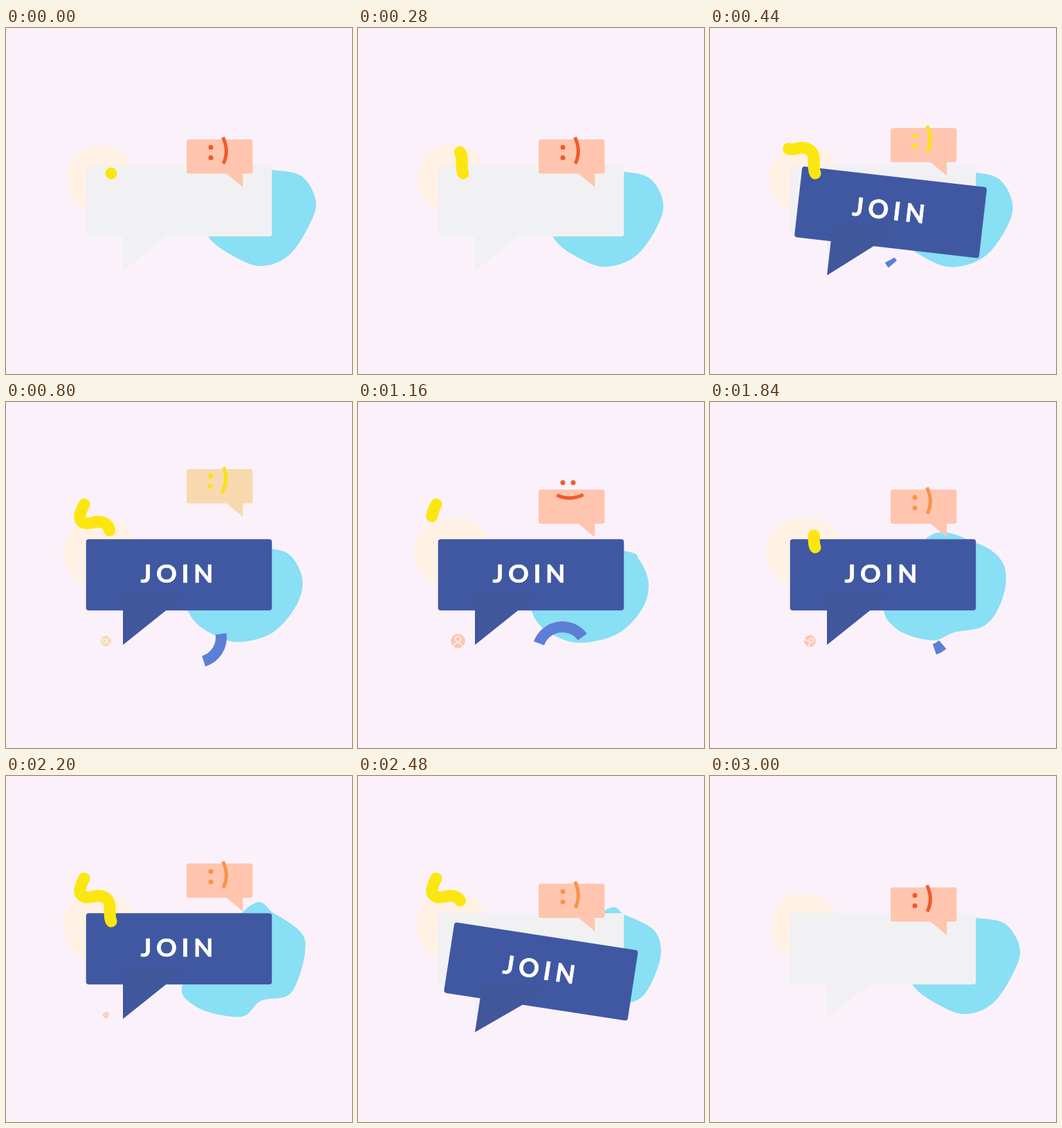
An HTML page for the animation above (3.04 s loop, 500x500 px).

```html
<!DOCTYPE html>
<html lang="en">
<head>
<meta charset="utf-8">
<title>Join</title>
<style>
html, body { margin: 0; width: 100%; height: 100%; overflow: hidden; background: #fbf1fb; }
svg { display: block; width: 100%; height: 100%; }
text { font: 700 37px Lato, "Open Sans", sans-serif; letter-spacing: 6.6px; fill: #fff; stroke: #fff; stroke-width: .7; }
</style>
</head>
<body>
<svg viewBox="0 0 500 500">
  <path id="cream" fill="#fff1e3"/>
  <path id="blob" fill="#89dff4"/>
  <g fill="#f1f1f3">
    <rect x="115.700" y="198.300" width="268.600" height="103" rx="4"/>
    <path d="M169 290H244L169 351Z"/>
  </g>
  <path id="arc" fill="none" stroke="#5c7fd5" stroke-width="16"/>
  <g id="join">
    <rect x="115.700" y="198.300" width="268.600" height="103" rx="4" fill="#4058a2"/>
    <path d="M169 275H262L231.500 301L169 351Z" fill="#40579c"/>
    <text x="194.500" y="260.500">JOIN</text>
  </g>
  <g id="chat">
    <g id="chatBody">
      <rect x="261" width="95.500" height="49.500" rx="3.500"/>
      <path d="M317 48H342.300V69Z"/>
    </g>
    <g id="smile">
      <circle cx="296" cy="11.500" r="3.500"/>
      <circle cx="296" cy="26.500" r="3.500"/>
      <path id="mouth" d="M313.500 -3Q323 17 314 35" fill="none" stroke-width="5"/>
    </g>
  </g>
  <g id="user">
    <circle id="disc" r="10.300"/>
    <g fill="none" stroke="#fbf1fb" stroke-width="1.800">
      <circle cy="-3" r="3.800"/>
      <path d="M-7 8.500A7.100 7.100 0 0 1 7 8.500"/>
    </g>
  </g>
  <path id="worm" pathLength="1" fill="none" stroke="#fbe70f" stroke-width="17" stroke-linecap="round"
    d="M152 210C149 203 150.500 197 150 188C149 175 138 171 126 174C113 178 103 172 108 160C109 155 111 152 113 148"/>
</svg>
<script>
const LOOP = 3040, STEP = 40;
const $ = id => document.getElementById(id);
const set = (id, name, value) => $(id).setAttribute(name, value);
const mix = (a, b, k) => a.map((v, i) => v + (b[i] - v) * k);
const ramp = (t, from, to) => Math.min(1, Math.max(0, (t - from) / (to - from)));
const ease = (t, from, to) => { const u = ramp(t, from, to); return u * u * (3 - 2 * u); };
const within = (t, from, to) => t >= from && t < to;
const polar = (cx, cy, r, deg) => {
  const a = deg * Math.PI / 180;
  return [cx + r * Math.cos(a), cy + r * Math.sin(a)];
};

// Closed smooth curve through a flat list of points.
function closed(p) {
  const n = p.length / 2;
  const pt = i => { const j = (i + n) % n; return [p[2 * j], p[2 * j + 1]]; };
  let d = "M" + pt(0);
  for (let i = 0; i < n; i++) {
    const a = pt(i - 1), b = pt(i), c = pt(i + 1), e = pt(i + 2);
    const h1 = b.map((v, k) => v + (c[k] - a[k]) / 6);
    const h2 = c.map((v, k) => v - (e[k] - b[k]) / 6);
    d += "C" + [h1, h2, c].join(" ");
  }
  return d + "Z";
}

const blobWide = [365,205, 384,205, 427,214, 448,251, 436,289, 408,329, 370,344, 333,332, 292,301, 275,245];
const blobRound = [255,202, 384,215, 407,229, 420,263, 410,300, 375,335, 323,348, 285,338, 257,315, 245,270];
const blobTall = [352,188, 388,199, 427,227, 432,255, 422,294, 406,318, 368,325, 339,348, 274,333, 259,293];

function drawBlobs(t) {
  let shape = mix(blobWide, blobRound, ramp(t, 0, 1160));
  shape = mix(shape, blobTall, ramp(t, 1160, 2200));
  set("blob", "d", closed(mix(shape, blobWide, ramp(t, 2200, 2960))));

  const swell = ramp(t, 0, 1160) - ramp(t, 1840, 3000);
  set("cream", "transform", `translate(137 215) scale(${.86 + .14 * swell} ${.96 + .04 * swell})`);
}

function drawArc(t) {
  const turn = 287 - 492 * ease(t, -600, 2600);
  const low = 76 - 162 * ramp(t, 380, 1220);
  const high = 76 - 162 * ramp(t, 1000, 1970);
  const [cx, cy] = polar(297, 339, 22, turn + 90);
  const end = deg => polar(cx, cy, 36, turn + deg - 90);
  set("arc", "d", high > low ? `M${end(low)}A36 36 0 0 1 ${end(high)}` : "");
}

function drawJoin(t) {
  const away = 1 - ramp(t, 320, 560) + ramp(t, 2320, 2560);
  set("join", "transform", `translate(0 ${90 * away ** 3.8}) rotate(${13.1 * away} 169 351)`);
  set("join", "opacity", Math.min(1, 3.2 * (1 - away)));
}

function drawChat(t) {
  const top = 161 - 64 * ease(t, 360, 600) + 29.5 * ease(t, 840, 1140) + 34.5 * ease(t, 2240, 2560);
  const turn = 90 * (ease(t, 740, 1140) - ease(t, 1480, 1800));
  const tint = within(t, 400, 1000) ? "#f9e215" : within(t, 1720, 2640) ? "#f7944a" : "#f15a29";
  set("chat", "transform", `translate(0 ${top})`);
  set("smile", "transform", `rotate(${turn} 314.25 8.25)`);
  set("smile", "fill", tint);
  set("mouth", "stroke", tint);
}

function drawUser(t) {
  const come = ramp(t, 400, 1160), go = ramp(t, 1400, 2520);
  const size = Math.sin((come - go) * Math.PI / 2);
  const turn = 190 * (come - 1) + 150 * go;
  set("user", "transform", `translate(144.5 345.5) rotate(${turn}) scale(${size})`);
}

// The worm grows from one end, then is eaten up from the same end, twice per loop.
function drawWorm(t) {
  const age = t < 1640 ? t : t - 1640;
  const head = ramp(age, 0, 550) ** 1.7, tail = ramp(age, 640, 1280);
  set("worm", "visibility", tail < 1 ? "visible" : "hidden");
  set("worm", "stroke-dasharray", `${Math.max(head - tail, .0001)} 3`);
  set("worm", "stroke-dashoffset", -tail);
}

function draw(t) {
  const peach = within(t, 640, 1000) ? "#f8d8ae" : "#ffc5af";
  set("chatBody", "fill", peach);
  set("disc", "fill", peach);
  for (const part of [drawBlobs, drawArc, drawJoin, drawChat, drawUser, drawWorm]) part(t);
}

set("cream", "d", closed([1,-48, 33,-39, 50,-17, 48,30, 13,55, -21,50, -45,35, -57,5, -49,-24, -27,-42]));

const begin = performance.now();
function tick() {
  const t = (performance.now() - begin) % LOOP;
  draw(Math.floor(t / STEP) * STEP);
  requestAnimationFrame(tick);
}
tick();
</script>
</body>
</html>
```
